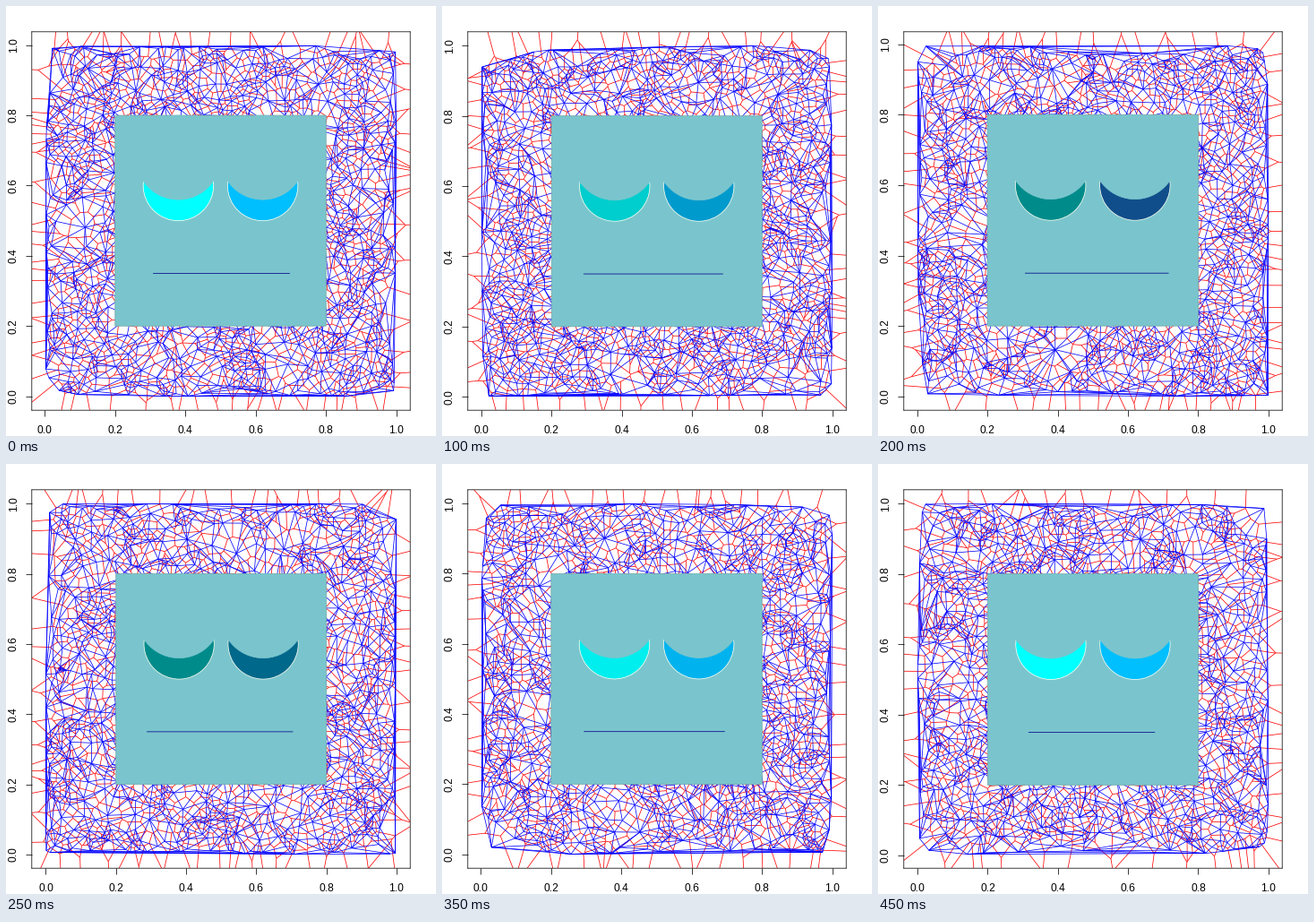
Recreate the animation shown at these times as a matplotlib script. Size 480 by 480 pixels, loop 0.5 s.

```python
import numpy as np
import matplotlib.pyplot as plt
from matplotlib.animation import FuncAnimation
from matplotlib.collections import LineCollection
from matplotlib.patches import Circle, Rectangle
from matplotlib.tri import Triangulation

SIZE, DPI, MARGIN = 480, 80, 28.8
PX = 72 / DPI                      # one pixel in points
LINE = 0.75 * PX
INNER = SIZE - 2 * MARGIN
POINTS, FRAMES, INTERVAL = 1000, 10, 50

FACE = "#7AC5CD"
LEVELS = np.array([255, 238, 205, 139, 139]) / 255
DARKEST = "#104E8B"

# Ends of the mouth for each step, in thousandths
MOUTH_LEFT = [308, 300, 291, 286, 307, 288, 300, 293, 310, 316]
MOUTH_RIGHT = [697, 690, 689, 697, 716, 705, 700, 694, 685, 677]

plt.rcParams["path.snap"] = False


def circumcentres(a, b, c):
    b, c = b - a, c - a
    d = 2 * (b[:, 0] * c[:, 1] - b[:, 1] * c[:, 0])
    bb, cc = (b ** 2).sum(1), (c ** 2).sum(1)
    x = (c[:, 1] * bb - b[:, 1] * cc) / d
    y = (b[:, 0] * cc - c[:, 0] * bb) / d
    return a + np.column_stack([x, y])


def mesh(pts):
    """Delaunay edges and Voronoi edges as segment arrays."""
    tri = Triangulation(pts[:, 0], pts[:, 1])
    corners = tri.triangles
    centres = circumcentres(*(pts[corners[:, k]] for k in range(3)))
    voronoi = []
    for k in range(3):
        near = tri.neighbors[:, k]
        inner = near > np.arange(len(near))
        voronoi.append(np.stack([centres[inner], centres[near[inner]]], axis=1))
        # Hull edges send a ray straight outwards.
        rim = near < 0
        edge = pts[corners[rim, (k + 1) % 3]] - pts[corners[rim, k]]
        out = np.column_stack([edge[:, 1], -edge[:, 0]])
        out /= np.linalg.norm(out, axis=1, keepdims=True)
        voronoi.append(np.stack([centres[rim], centres[rim] + 3 * out], axis=1))
    return pts[tri.edges], np.concatenate(voronoi)


def padded(values):
    lo, hi = values.min(), values.max()
    pad = 0.04 * (hi - lo)
    return lo - pad, hi + pad


def eye_colours(i):
    """Both eyes darken towards the middle of the loop, then brighten."""
    shade = max(0, 4 - abs(i - 4))
    level = LEVELS[shade]
    right = DARKEST if shade == 4 else (0, 0.75 * level, level)
    return (0, level, level), right


fig = plt.figure(figsize=(SIZE / DPI, SIZE / DPI), dpi=DPI, facecolor="white")
ax = fig.add_axes([MARGIN / SIZE, MARGIN / SIZE, INNER / SIZE, INNER / SIZE])
ticks = np.arange(6) / 5
ax.set_xticks(ticks)
ax.set_yticks(ticks)
ax.tick_params(length=7.2 * PX, width=LINE, labelbottom=False, labelleft=False)
for spine in ax.spines.values():
    spine.set_linewidth(LINE)

font = dict(family="Liberation Sans", size=12 * PX, ha="center", va="baseline")
for t in ticks:
    ax.text(t, -25.8 / INNER, f"{t:.1f}", transform=ax.get_xaxis_transform(), **font)
    ax.text(-16.8 / INNER, t, f"{t:.1f}", transform=ax.get_yaxis_transform(),
            rotation=90, rotation_mode="anchor", **font)

red = ax.add_collection(LineCollection([], colors="red", linewidths=LINE, zorder=1))
blue = ax.add_collection(LineCollection([], colors="blue", linewidths=LINE, zorder=1.1))

ax.add_patch(Rectangle((.2, .2), .6, .6, fc=FACE, ec="#74A9A6", lw=LINE, zorder=2))
eyes = []
for x in (.38, .62):
    eyes.append(ax.add_patch(Circle((x, .6), .1, ec="#FFFFF0", lw=LINE, zorder=2.1)))
    ax.add_patch(Circle((x, .68), .12, fc=FACE, ec=FACE, lw=LINE, zorder=2.2))
mouth, = ax.plot([], [], color="#00008B", lw=LINE, solid_capstyle="butt", zorder=2.3)


def update(i):
    pts = np.random.default_rng(i).random((POINTS, 2))
    delaunay, voronoi = mesh(pts)
    blue.set_segments(delaunay)
    red.set_segments(voronoi)
    ax.set_xlim(padded(pts[:, 0]))
    ax.set_ylim(padded(pts[:, 1]))
    for eye, colour in zip(eyes, eye_colours(i)):
        eye.set_facecolor(colour)
    mouth.set_data((MOUTH_LEFT[i] / 1000, MOUTH_RIGHT[i] / 1000), (.35, .35))
    return blue, red, mouth, *eyes


anim = FuncAnimation(fig, update, frames=FRAMES, interval=INTERVAL,
                     repeat=True, repeat_delay=0, blit=False)
plt.show()
```
